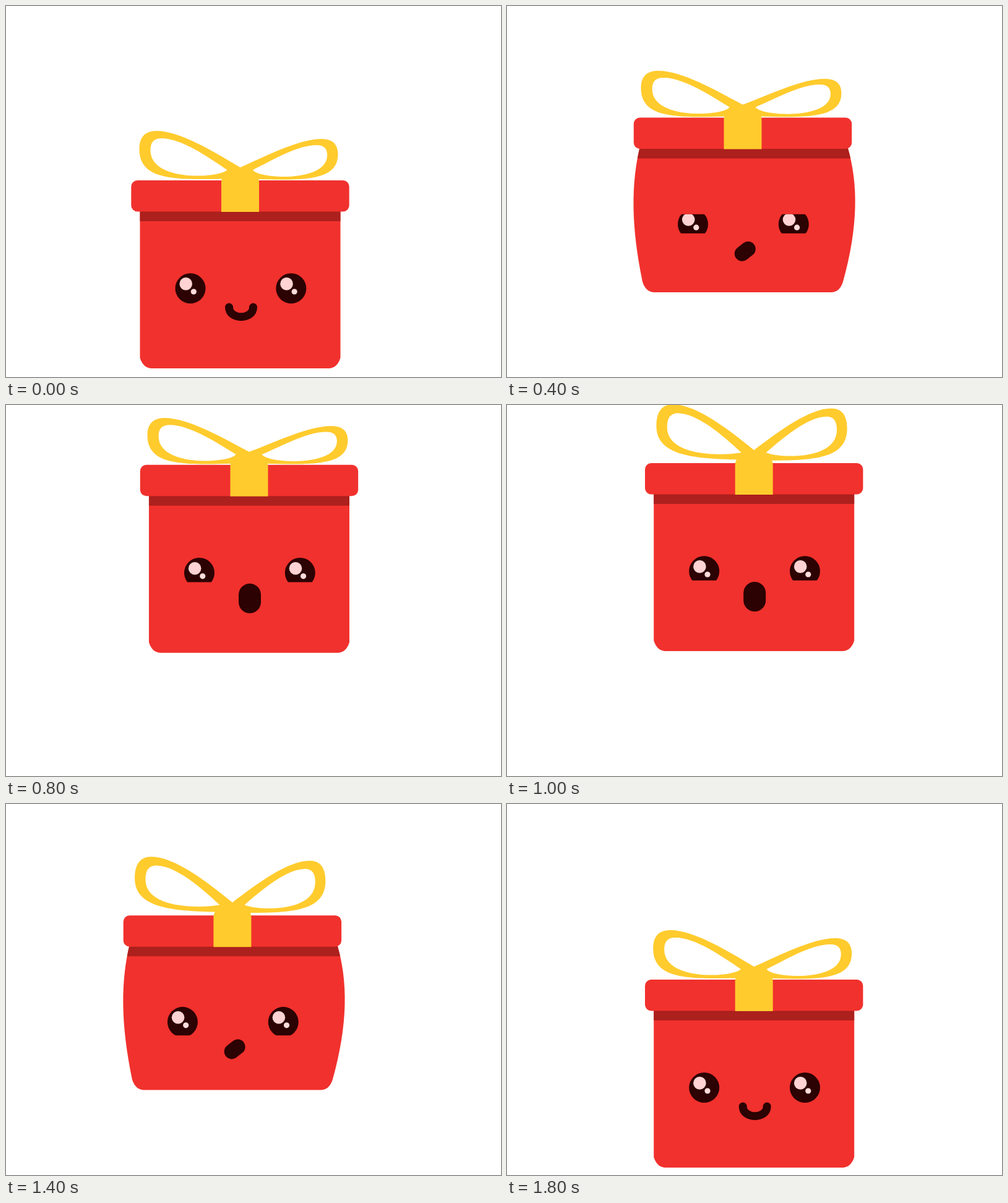
Animation of 800x600 px, one loop 1.9 s. Source, as an HTML page with a canvas:

```html
<!DOCTYPE html>
<html lang="en">
<head>
<meta charset="utf-8">
<title>Jumping gift box</title>
<style>
html, body { margin: 0; width: 100%; height: 100%; overflow: hidden; background: #fff; }
canvas { display: block; }
</style>
</head>
<body>
<canvas id="stage" width="800" height="600"></canvas>
<script>
const ctx = document.getElementById('stage').getContext('2d');
const RED = '#f1312d', SHADE = '#ac201d', GOLD = '#ffcb2d', DARK = '#2c0202';
const STEP = 100, STEPS = 19;

// Jump path of the lid's top centre, joined by a smooth curve.
const path = [
  { t: 0, x: 378.5, y: 282 },
  { t: 4, x: 381, y: 180.5 },
  { t: 6, x: 382.5, y: 117.5 },
  { t: 10, x: 399.2, y: 94 },
  { t: 12, x: 375.3, y: 138.5 },
  { t: 16, x: 366, y: 224.5 },
  { t: 18, x: 399.2, y: 284 }
];

const SMILE = { x1: -18, y1: 205, x2: 21, y2: 205, width: 13, depth: 21 };
const FLAT = { x1: -3, y1: 218, x2: 16, y2: 215, width: 13, depth: 0 };
const OPEN = { x1: 1, y1: 222, x2: 1, y2: 210, width: 36, depth: 0 };

const clamp = v => Math.min(1, Math.max(0, v));
const ramp = (t, from, to) => clamp((t - from) / (to - from));
const hump = (t, from, to) => Math.sin(Math.PI * ramp(t, from, to));

function blend(a, b, k) {
  const out = {};
  for (const name in a) out[name] = a[name] + (b[name] - a[name]) * k;
  return out;
}

function along(t, axis) {
  const i = Math.max(1, path.findIndex(key => key.t >= t));
  const slope = n => {
    const before = path[Math.max(0, n - 1)], after = path[Math.min(path.length - 1, n + 1)];
    return (after[axis] - before[axis]) / (after.t - before.t);
  };
  const a = path[i - 1], b = path[i], span = b.t - a.t;
  const k = (t - a.t) / span, r = 1 - k;
  return a[axis] * r * r * (1 + 2 * k) + b[axis] * k * k * (3 - 2 * k) +
    span * k * r * (r * slope(i - 1) - k * slope(i));
}

function disc(x, y, r, color) {
  ctx.fillStyle = color;
  ctx.beginPath();
  ctx.arc(x, y, r, 0, Math.PI * 2);
  ctx.fill();
}

function drawBody(h, bulge) {
  const left = -162 - bulge * 1.2, right = 162 + bulge * 1.6;
  ctx.save();
  ctx.beginPath();
  ctx.moveTo(-162 - bulge * 0.25, 46);
  ctx.bezierCurveTo(left, 50 + h * 0.2, left, h * 0.62, -162, h - 17);
  ctx.quadraticCurveTo(-157, h - 1, -144, h);
  ctx.lineTo(144, h);
  ctx.quadraticCurveTo(157, h - 1, 162, h - 17);
  ctx.bezierCurveTo(right, h * 0.62, right, 50 + h * 0.2, 162 + bulge * 0.45, 46);
  ctx.fillStyle = RED;
  ctx.fill();
  ctx.clip();
  ctx.fillStyle = SHADE;
  ctx.fillRect(-200, 46, 400, 20);
  ctx.restore();
}

function drawLid() {
  ctx.fillStyle = RED;
  ctx.beginPath();
  ctx.roundRect(-176.2, 0, 352.4, 50.5, 10);
  ctx.fill();
}

// One ribbon loop of width w and height h; a tall loop also lifts off the lid.
function drawLoop(side, w, h) {
  const lift = ramp(h, 78, 110);
  const innerW = w * 0.89, innerH = h * 0.85;
  ctx.save();
  ctx.scale(side, 1);
  ctx.beginPath();
  ctx.moveTo(0, -21);
  ctx.bezierCurveTo(w * 0.27, -h * 0.59, w * 0.6, -h, w * 0.83, -h);
  ctx.bezierCurveTo(w * 0.95, -h, w, -h * 0.86, w, -h * 0.63);
  ctx.bezierCurveTo(w, h * (0.02 - lift * 0.32), w * 0.65, -h * lift * 0.14, w * 0.16, -2 - lift * 7);
  ctx.closePath();
  ctx.moveTo(w * 0.13, -17);
  ctx.bezierCurveTo(w * 0.31, -h * 0.46, w * 0.58, -innerH, w * 0.78, -innerH);
  ctx.bezierCurveTo(w * 0.86, -innerH, innerW, -h * 0.76, innerW, -h * 0.61);
  ctx.bezierCurveTo(innerW, h * (0.07 - lift * 0.37), w * (0.17 + lift * 0.36), -h * (0.04 + lift * 0.14), w * 0.13, -17);
  ctx.fill('evenodd');
  ctx.restore();
}

function drawBow(t) {
  const press = 13.5 * hump(t, 3.5, 8.5) + 9.5 * hump(t, 14, 18);
  const lift = hump(t, 9, 15);
  const leftDelta = 30 * lift - press, rightDelta = 43 * lift - press;
  ctx.fillStyle = GOLD;
  drawLoop(-1, 163 - leftDelta * 0.35, 80 + leftDelta);
  drawLoop(1, 158 - rightDelta * 0.35, 67 + rightDelta);
  ctx.beginPath();
  ctx.moveTo(-30.5, 51);
  ctx.lineTo(-30.5, 2);
  ctx.bezierCurveTo(-30, -6, -24, -13, -16, -16);
  ctx.lineTo(0, -21);
  ctx.lineTo(16, -16);
  ctx.bezierCurveTo(24, -13, 30, -6, 30.5, 2);
  ctx.lineTo(30.5, 51);
  ctx.fill();
}

function drawEye(x, y, top, bottom) {
  ctx.save();
  ctx.translate(x, y);
  ctx.beginPath();
  ctx.rect(-30, top, 60, bottom - top);
  ctx.clip();
  disc(0, 0, 24.5, DARK);
  disc(-7.3, -7.3, 10.3, '#ffd3d3');
  disc(5.3, 5.3, 4.6, '#ffdcdc');
  ctx.restore();
}

function drawMouth(t) {
  const smile = 1 - ramp(t, 0, 2) + ramp(t, 16, 18);
  const open = ramp(t, 2, 6) - ramp(t, 12, 16);
  const m = blend(blend(FLAT, OPEN, open), SMILE, smile);
  ctx.strokeStyle = DARK;
  ctx.lineWidth = m.width;
  ctx.lineCap = 'round';
  ctx.beginPath();
  ctx.moveTo(m.x1, m.y1);
  ctx.bezierCurveTo(m.x1, m.y1 + m.depth, m.x2, m.y2 + m.depth, m.x2, m.y2);
  ctx.stroke();
}

function drawGift(t) {
  const squash = 22 * hump(t, 0, 7) + 25 * hump(t, 12, 18);
  const bulge = 18 * (hump(t, 0, 6) + hump(t, 12, 18));
  const eyeTop = -25 + 9 * hump(t, 3, 5);
  const eyeBottom = 25 - 10 * (ramp(t, 3, 4) - ramp(t, 12, 15));
  ctx.save();
  ctx.translate(along(t, 'x'), along(t, 'y'));
  drawBody(304 - squash, bulge);
  drawLid();
  drawBow(t);
  for (const x of [-80.5, 82.3]) drawEye(x, 174.7 - squash * 0.11, eyeTop, eyeBottom);
  drawMouth(t);
  ctx.restore();
}

function render(now) {
  ctx.fillStyle = '#fff';
  ctx.fillRect(0, 0, 800, 600);
  drawGift(Math.floor(now / STEP) % STEPS);
  requestAnimationFrame(render);
}
render(0);
</script>
</body>
</html>
```
